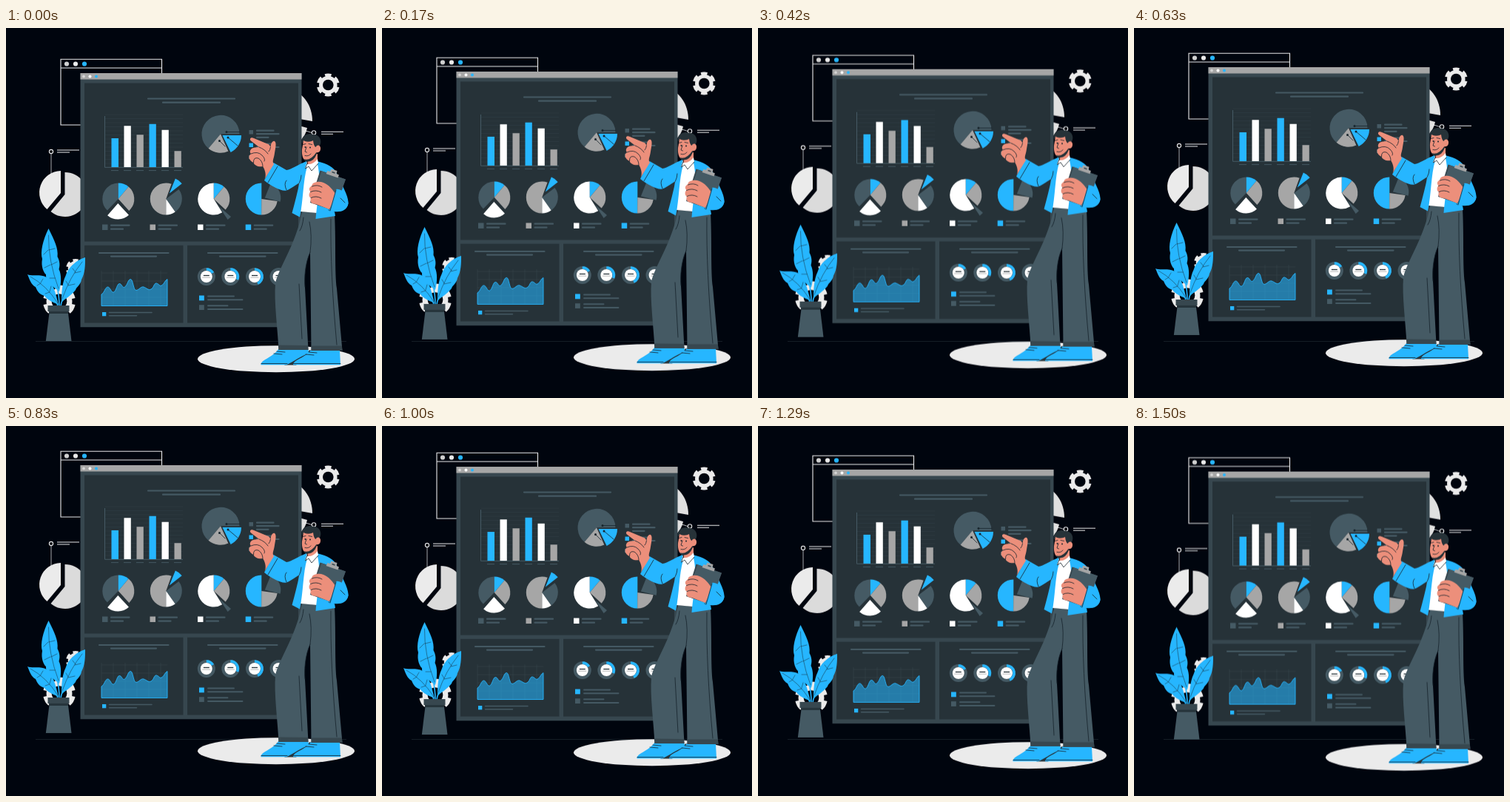
An HTML page without scripts that plays this animation: 500 px wide and 500 px high, repeating every 1540 ms.

```html
<!DOCTYPE html>
<html lang="en">
<head>
<meta charset="utf-8">
<title>Dashboard presentation</title>
<style>
html, body { margin: 0; width: 100%; height: 100%; overflow: hidden; background: #00050e; }
svg { display: block; width: 100vw; height: 100vh; fill: none; }
.scene { animation: float 1540ms -4ms infinite; }
@keyframes float {
  0% { transform: translateY(0); animation-timing-function: steps(18); }
  48.648% { transform: translateY(-9.73px); }
  48.649% { transform: translateY(-9.19px); animation-timing-function: steps(19); }
  100% { transform: translateY(1.08px); }
}
.blue { fill: #26b6ff; } .white { fill: #fff; } .grey { fill: #a6a6a6; }
.slate { fill: #455a64; } .frame { fill: #37474f; } .panel { fill: #263238; }
.pale { fill: #ebebeb; } .skin { fill: #ec8f7b; }
.bars { stroke: #455a64; stroke-width: 2.2; stroke-linecap: round; }
.ink { stroke: #17242c; stroke-width: .8; stroke-linecap: round; stroke-linejoin: round; }
.wire { stroke: #ebebeb; stroke-width: 1.1; }
/* wedges: dash length is the angle in degrees */
.pie circle { r: 10.75px; stroke-width: 21.5; }
.big circle { r: 12.75px; stroke-width: 25.5; }
.b { stroke: #26b6ff; } .w { stroke: #fff; } .g { stroke: #a6a6a6; } .s { stroke: #455a64; }
</style>
</head>
<body>
<svg viewBox="0 0 500 500">
<defs>
  <g id="gear">
    <circle r="9.8" stroke="#ebebeb" stroke-width="5"/>
    <circle r="13" stroke="#ebebeb" stroke-width="5" pathLength="60" stroke-dasharray="6 4" stroke-dashoffset="-2"/>
  </g>
  <g id="legend">
    <rect width="7.5" height="7.5" fill="currentColor"/>
    <path class="bars" d="M12 1.2H36.500M12 6.200H28"/>
  </g>
  <g id="ring">
    <circle r="10" stroke="#455a64" stroke-width="4"/>
    <circle class="white" r="8"/>
    <path d="M-4-1.500H4" stroke="#263238" stroke-width="1.300"/>
    <path d="M-5.500 1.200H5.500" stroke="#a6a6a6" stroke-width=".8"/>
  </g>
</defs>

<path d="M40 423.500H460" stroke="#1b252d" stroke-width=".8"/>

<g class="scene">
  <ellipse class="pale" cx="365" cy="447.200" rx="106" ry="18"/>

  <!-- backdrop -->
  <g class="wire">
    <path d="M74 42.200H210.500V131H74ZM74 54H210.500"/>
    <circle cx="61" cy="167" r="2.600"/>
    <path d="M61 170V207" stroke-width=".7"/>
    <path d="M69 165H99M69 168H86"/>
  </g>
  <circle cx="82" cy="48.500" r="3.100" fill="#d0d0d0"/>
  <circle class="pale" cx="94" cy="48.500" r="3.100"/>
  <circle class="blue" cx="106" cy="48.500" r="3.100"/>
  <path class="pale" d="M74 193A29.500 29.500 0 0 0 55.500 245L74 223Z"/>
  <path d="M79.500 195A30 30 0 1 1 60.500 248L79.500 225Z" fill="#dbdbdb"/>
  <use href="#gear" x="435.300" y="77"/>
  <use href="#gear" transform="translate(94 325) scale(.84)"/>
  <use href="#gear" transform="translate(72 369.500) scale(1.420)"/>
  <path d="M386 84C402 88 414 105 414 126L386 121Z" fill="#e0e0e0"/>
  <path d="M396 132L407 135Q405 145 398 152Z" fill="#e0e0e0"/>
  <g class="wire">
    <path d="M401 139.500H407L413 141.500" stroke-width=".8"/>
    <circle cx="416" cy="141.500" r="2.700"/>
    <path d="M426 140.300H456M426 143.300H442"/>
  </g>

  <!-- dashboard window -->
  <path class="frame" d="M100.500 61H399.500V404.300H100.500Z"/>
  <path class="grey" d="M100.500 61H399.500V69.500H100.500Z"/>
  <circle cx="105" cy="65.400" r="1.900" fill="#d5d5d5"/>
  <circle class="white" cx="113.500" cy="65.400" r="2"/>
  <circle class="blue" cx="122" cy="65.400" r="2"/>
  <path class="panel" d="M106 74.500H395V288.500H106ZM106 293.700H239.500V398.500H106ZM245 293.700H395V398.500H245Z"/>
  <path class="bars" d="M192 95.500H309M212 100.700H289M126 304H219.500M142 308.600H203M273 304H366.500M289 308.600H350.500"/>

  <!-- bar chart -->
  <path d="M134 117H239M134 122.500H239M134 128H239M134 133.500H239M134 139H239M134 144.500H239M134 150H239M134 155.500H239M134 161H239M134 166.500H239M134 172H239M134 177.500H239M134 183H239" stroke="#323f46" stroke-width=".6"/>
  <path d="M133.500 119V188.300H239" stroke="#455a64"/>
  <path d="M142 192.600H237" stroke="#455a64" stroke-dasharray="10 7"/>
  <path class="blue" d="M142.500 149H152V188H142.500ZM193.500 129.700H202.800V188H193.500Z"/>
  <path class="white" d="M159.500 132.300H168.800V188H159.500ZM210.500 137.700H219.800V188H210.500Z"/>
  <path class="grey" d="M176.500 144.300H185.800V188H176.500ZM227.500 166.300H236.800V188H227.500Z"/>

  <!-- main pie -->
  <g class="big">
    <g transform="translate(290 143.300)">
      <circle class="s" pathLength="360" stroke-dasharray="230 130" transform="rotate(130)"/>
      <circle class="g" pathLength="360" stroke-dasharray="64 296" transform="rotate(66)"/>
    </g>
    <g transform="translate(292.500 145)">
      <circle class="b" pathLength="360" stroke-dasharray="64 296"/>
    </g>
  </g>
  <path class="ink" d="M298 140.500H316M300 148L313 159M288.500 152.500L296 160"/>
  <g fill="#17242c"><circle cx="298" cy="140.500" r="1.500"/><circle cx="300" cy="148" r="1.500"/><circle cx="288.500" cy="152.500" r="1.500"/></g>
  <path class="slate" d="M328.500 138H334V143.500H328.500Z"/>
  <path class="blue" d="M328.500 155.500H334V161H328.500Z"/>
  <path class="grey" d="M328.500 172H334V177H328.500Z"/>
  <path class="bars" d="M339 138.700H361.500M339 143.200H368.500M339 147.800H354.500M339 156.500H361.500M339 161H368.500M339 165.500H354.500"/>

  <!-- row of pies -->
  <g class="pie">
    <g transform="translate(151.800 231)">
      <circle class="s" pathLength="360" stroke-dasharray="136 224" transform="rotate(134)"/>
      <circle class="b" pathLength="360" stroke-dasharray="40 320" transform="rotate(-90)"/>
      <circle class="g" pathLength="360" stroke-dasharray="98 262" transform="rotate(-50)"/>
      <circle class="w" pathLength="360" stroke-dasharray="84 276" transform="translate(-.5 6) rotate(47)"/>
    </g>
    <g transform="translate(216.300 231)">
      <circle class="g" pathLength="360" stroke-dasharray="200 160" transform="rotate(90)"/>
      <circle class="s" pathLength="360" stroke-dasharray="92 268" transform="rotate(-37)"/>
      <circle class="w" pathLength="360" stroke-dasharray="35 325" transform="rotate(55)"/>
      <circle class="b" pathLength="360" stroke-dasharray="30 330" transform="translate(4.500 -7.500) rotate(-68)"/>
    </g>
    <g transform="translate(280.800 231)">
      <circle class="w" pathLength="360" stroke-dasharray="212 148" transform="rotate(58)"/>
      <circle class="b" pathLength="360" stroke-dasharray="40 320" transform="rotate(-90)"/>
      <circle class="g" pathLength="360" stroke-dasharray="93 267" transform="rotate(-50)"/>
      <circle class="s" pathLength="360" stroke-dasharray="16 344" transform="translate(7 10) rotate(41)"/>
    </g>
    <g transform="translate(345.300 231)">
      <circle class="b" pathLength="360" stroke-dasharray="180 180" transform="rotate(90)"/>
      <circle class="g" pathLength="360" stroke-dasharray="82 278" transform="rotate(8)"/>
      <circle class="s" pathLength="360" stroke-dasharray="82 278" transform="translate(4.500 -1.500) rotate(-68)"/>
    </g>
  </g>
  <use href="#legend" x="130" y="265.500" color="#455a64"/>
  <use href="#legend" x="194.500" y="265.500" color="#a6a6a6"/>
  <use href="#legend" x="259" y="265.500" color="#fff"/>
  <use href="#legend" x="323.700" y="265.500" color="#26b6ff"/>

  <!-- area chart -->
  <path d="M129 328V375.500H218M145 328V375M161 328V375M177 328V375M193 328V375M209 328V375M129 331H218M129 342H218M129 353H218M129 364H218" stroke="#37454c" stroke-width=".6"/>
  <path d="M129 360C133 358 134 350 137.500 350S142 358 145.500 357S150 345 153.500 345.500S157 352 160.500 350S165 339 168.500 339.500S172 355 176 354.500S182 349 186 350S192 355 196 353S200 344 203.500 345S208 350 211 347.500S215 341 218 339.500V375.500H129Z" fill="#26b6ff" fill-opacity=".57" stroke="#26b6ff" stroke-width=".9"/>
  <path class="blue" d="M130 384H135.300V389.300H130Z"/>
  <path class="bars" style="stroke-width:1.500" d="M139.500 384.600H197M139.500 388.700H176.500"/>

  <!-- rings -->
  <use href="#ring" x="270.800" y="336"/>
  <use href="#ring" x="303.300" y="336"/>
  <use href="#ring" x="336" y="336"/>
  <use href="#ring" x="368.500" y="336"/>
  <g class="b" stroke-width="3.600">
    <path d="M270.800 326A10 10 0 0 1 279.500 331"/>
    <path d="M303.300 326A10 10 0 0 1 312.500 340"/>
    <path d="M336 326A10 10 0 0 1 340 345.200"/>
  </g>
  <path class="blue" d="M261 361.500H267.800V368.300H261Z"/>
  <path class="slate" d="M261 374.200H267.800V381H261Z"/>
  <path class="bars" style="stroke-width:1.900" d="M273 362.500H308M273 367.200H319.500M273 375.200H299.500M273 380H319.500"/>

  <!-- plant -->
  <path d="M69 350Q72 362 72 376M79 362Q75 368 74 376M64 366Q69 370 70 376" stroke="#26b6ff" stroke-width="1.600"/>
  <g class="blue">
    <path d="M57.500 271C50 286 46 303 49 312C47 322 51 331 54 333C53 341 62 349 72 356C75 344 75 333 71.500 326C74 318 71 312 69.500 309C71 298 65 286 57.500 271Z"/>
    <path d="M107 310C96 313 84 323 80.500 335C76 344 75 357 75 371C79 366 88 362 94 354C95 350 101 347 102 340C107 331 107 320 107 310Z"/>
    <path d="M29 333C35 336 47 332 55 337C63 342 67 358 71 374C64 371 55 367 52 362C45 360 42 355 40 350C34 347 32 340 29 333Z"/>
  </g>
  <path class="ink" stroke-opacity=".6" d="M57.500 280Q57 315 71 352M57 300L51 306M58 300L66 298M60 320L52 324M61 320L69 316M66 338L59 338M103 316Q86 337 76 366M94 330L90 325M93 331L101 329M84 347L81 342M84 348L93 346M33 336Q55 348 70 372M47 344L50 339M47 345L42 348M59 356L61 349M59 357L53 359"/>
  <path class="slate" d="M59 381H83.500L88.500 423H53.800Z"/>
  <path d="M58 383H84V386H58Z" fill="#26343b"/>
  <path class="frame" d="M56.500 375H85.500V383H56.500Z"/>

  <!-- shoes and trousers -->
  <path d="M376 455.500L411 435L416 439L392 455.500Z" fill="#26343b"/>
  <path class="blue" d="M344.500 455.300C344 448 360 446 368 434H408L410 439C397 444 390 450 379 455.300ZM388 455.300C388 448 405 446 412 435H451L452 455.300Z"/>
  <path class="ink" d="M345 453.500H380M388.500 453.500H452M362 440L373 441M366 437L377 438M405 441L416 442M409 438L420 439"/>
  <path class="slate" d="M400 248L444 252C446 290 444 330 447 352L454.500 436H412.500L411 303C404 318 403 338 404 350L408.500 435H368.500C367 405 362 370 364 345C368 325 393 290 400 248Z"/>
  <path class="frame" d="M368 428.500L408 429L408.500 435H368.500ZM412.500 429.500H453.800L454.500 436H412.500Z"/>
  <path class="ink" d="M411 303Q414 280 410 262M411 303C404 318 403 338 404 350M439 258Q438 330 447 428M396 346L400 420M402 256Q401 268 397 274"/>

  <!-- torso -->
  <path class="white" d="M405 187L423 182L428 210L420 250L398 248L399 215Z"/>
  <path class="blue" d="M406 180C394 185 386 191 379 192L361.500 182L349 206C359 214 372 221 379 219.500C386 217 393 211 396.500 209C394 222 390 237 386.500 250L397 255.500C402 232 401 208 407 187Z"/>
  <path class="blue" d="M420 180C436 184 443 188 447 197C453 211 463 226 462.500 237C461 247 452 249 444 248L445 254L418.500 258C421 230 427 205 420 180Z"/>
  <path class="ink" d="M396.500 209Q399 204 399 199M354 209L367 187M379 219Q375 210 379 206M444 248L436 246M448 222L456 231"/>
  <path class="skin" d="M407 173L421 170L421 182Q415 190 408 186Z"/>
  <path class="white" d="M407 180L404 190L409 187L413 193L422 183L421 177Q415 185 407 184Z"/>
  <path class="ink" d="M407 183L404.500 190L409 187L413 193L422 183"/>

  <!-- head -->
  <path class="panel" d="M400 155C398 145 409 141 415 144C423 143 428 152 424 159L423 167L417 170L409 153Z"/>
  <path class="skin" d="M402 152C406 154 411 154 415 152Q416 160 418.500 161C421 156 426 159 425 164C424.500 168 421 169 419.500 168C419 175 414 180 408 180C401 180 399.500 172 400 164Z"/>
  <path class="panel" d="M402 177Q411 180.500 419.500 168V171Q416 180 408.500 180.500Q404 180.500 402 177Z"/>
  <path class="ink" d="M401.500 157.500L405 156.500M409 156.500L413.500 157.500M406 161L404 167L406.500 168M404 172.500Q409 174 412 170"/>
  <circle cx="404.500" cy="161" r="1" fill="#17242c"/>
  <circle cx="411" cy="161.500" r="1" fill="#17242c"/>

  <!-- pointing hand -->
  <path class="skin" d="M349 205C352 201 351 193 347 187C341 188 336 186 334.500 182C328 179 327 173 331 170C328 167 331 162 336 161.500L342 161L331 152.500C328 149 332 147 335 149L353 156.500C356 157 357 160 357.500 161C358 156 360 152 363 153C366 155 364 163 363 169C362 177 359 180 362 184Z"/>
  <path class="ink" d="M342 161Q350 164 354 170M331 170Q340 166 346 172Q351 177 349 180M334.500 182Q334 174 341 176Q347 180 347 187M357.500 161Q357 165 355 167"/>

  <!-- clipboard -->
  <path class="frame" d="M424.500 192.500L459 204.500L443.500 247L411 236Z"/>
  <path class="slate" d="M426.500 193.200L459 204.500L444 246L412 235Z"/>
  <path class="grey" d="M432.500 197L434.500 193L438 194L439.500 190.500L447.500 193L446.500 197L450 198.500L448.500 202.500Z"/>
  <path d="M440.500 194.500L444.500 196" stroke="#37474f" stroke-width="1.500"/>
  <path class="skin" d="M446 226C442 218 436 212 429 209C422 206 413 209 413.500 213C408 216 410 220 411.500 221C408 225 410 229 412 229.500C410 235 413 238 419 238L437 245Z"/>
  <path class="ink" d="M413.500 214Q421 211 427 215M411.500 221.500Q419 218 426 222M412 229.500Q419 226 426 230"/>
  <path class="blue" d="M446 218C453 216 462 226 462.500 237C461 247 450 249 437 248Z"/>
  <path class="ink" d="M446 219L438 247M452 230L458 236"/>
</g>
</svg>
</body>
</html>
```
